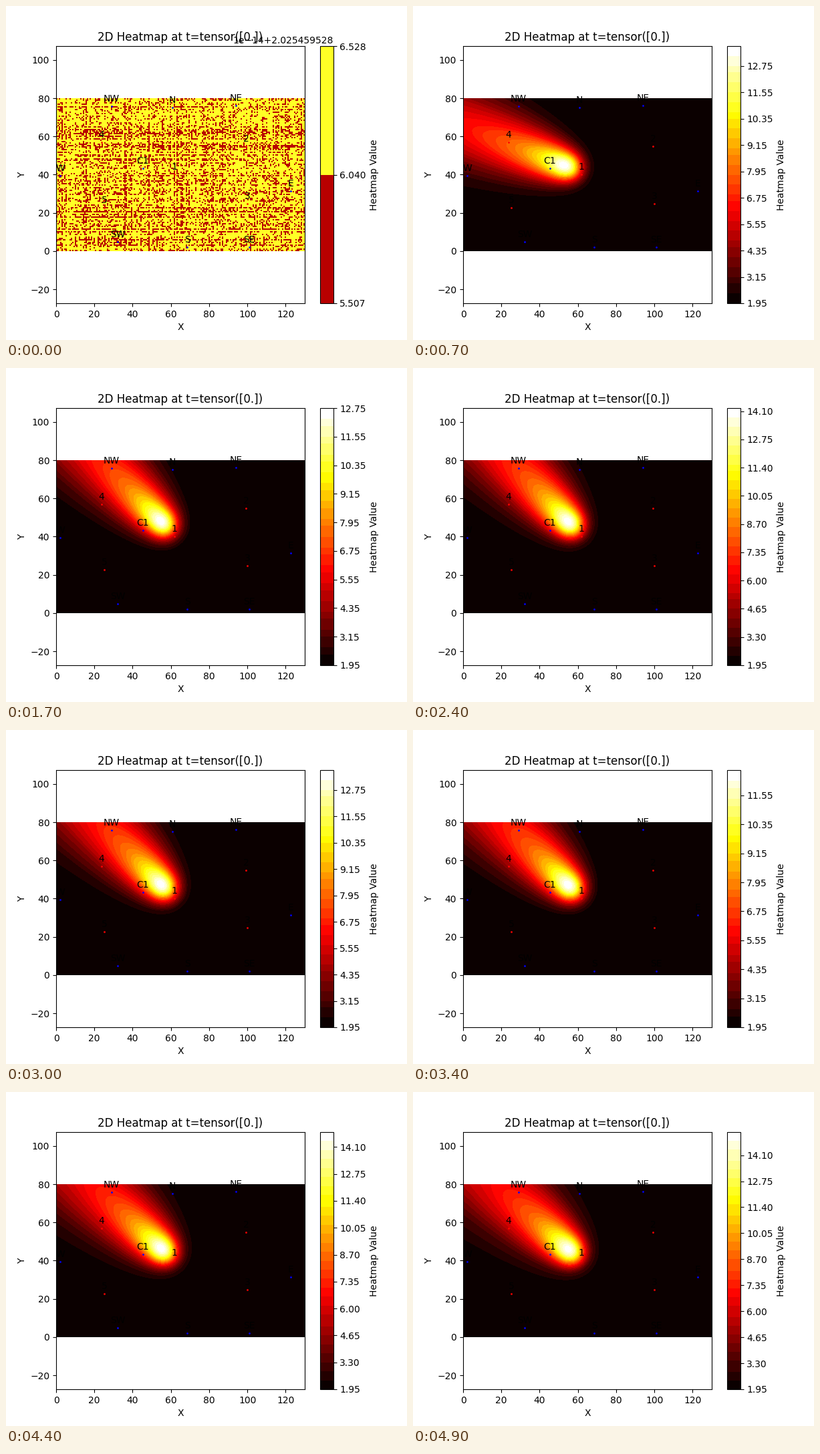
Animation, 600 px wide and 500 px high, one loop 5000 ms. Source, as a matplotlib script:

```python
import numpy as np
import matplotlib.pyplot as plt
from matplotlib.animation import FuncAnimation
from matplotlib.colors import ListedColormap

FRAMES, INTERVAL = 50, 100
BACKGROUND = 2.025459528
WIDTH, HEIGHT = 130, 80
HOT = plt.get_cmap("hot")
HOT_BANDS = plt.get_cmap("hot", 28)

RED_SITES = {"1": (61.9, 40.2), "2": (99.4, 54.7), "3": (100.1, 24.8),
             "4": (23.6, 57.0), "5": (25.3, 22.7)}
BLUE_SITES = {"N": (60.8, 75.0), "NE": (94.0, 76.2), "E": (122.8, 31.3),
              "SE": (101.0, 2.1), "S": (68.5, 2.1), "SW": (32.3, 4.9),
              "W": (2.2, 39.5), "NW": (29.0, 75.7), "C1": (45.4, 43.3)}

# The maximum drifts between a few turning points.
PEAK_FRAMES = [1, 7, 17, 24, 30, 36, 39, 49]
PEAK_VALUES = [13.1, 13.6, 12.7, 14.2, 13.6, 12.0, 14.5, 15.2]

X, Y = np.meshgrid(np.linspace(0, WIDTH, 131), np.linspace(0, HEIGHT, 81))
PUFFS = np.arange(0, 150, 1.5)


def plume(along, across, spread):
    """Sum of Gaussian puffs that widen as they drift downwind."""
    total = np.zeros(np.shape(along))
    for s in PUFFS:
        var = 21 + spread * s
        total += var ** -1.15 * np.exp(-((along - s) ** 2 + across ** 2) / (2 * var))
    return total


def concentration(frame):
    turn = 1 / (1 + np.exp((12 - frame) / 2))
    angle = np.radians(20 + 31 * turn - 0.18 * frame)
    px = 52.5 + 2.4 * turn
    py = 44.2 + 4.6 * turn - 0.075 * (frame - 12)
    spread = 2.6 + 0.02 * frame

    dx, dy = -np.cos(angle), np.sin(angle)
    axis = np.linspace(0, 20, 201)
    profile = plume(axis, 0, spread)
    rx, ry = X - px, Y - py
    along = rx * dx + ry * dy + axis[profile.argmax()]
    field = plume(along, rx * dy - ry * dx, spread) / profile.max()
    peak = np.interp(frame, PEAK_FRAMES, PEAK_VALUES)
    return BACKGROUND + (peak - BACKGROUND) * field


def draw_rounding_noise(ax):
    rng = np.random.default_rng(4)
    ny, nx = 115, 186
    row, col = rng.normal(size=(ny, 1)), rng.normal(size=(1, nx))
    noise = 0.9 * rng.normal(size=(ny, nx)) + 0.5 * row + 0.4 * col
    noise += 0.4 * rng.normal(size=(ny, 1)) * rng.normal(size=(1, nx))
    mesh = ax.pcolormesh(np.linspace(0, WIDTH, nx + 1), np.linspace(0, HEIGHT, ny + 1),
                         noise > np.quantile(noise, 0.3), vmin=0, vmax=1,
                         cmap=ListedColormap([HOT(6 / 23), HOT(18 / 23)]))
    bar = fig.colorbar(mesh, ax=ax, label="Heatmap Value", ticks=[0, 0.5, 1])
    bar.ax.set_yticklabels(["5.507", "6.040", "6.528"])
    fig.text(489.5 / 600, 1 - 55.8 / 500, "1e\u221214+2.025459528", ha="right")


def draw_sites(ax, sites, color):
    for name, (x, y) in sites.items():
        ax.plot(x, y, "o", color=color, markersize=1)
        ax.annotate(name, (x, y), xytext=(0, 5), textcoords="offset points",
                    ha="center")


def update(frame):
    fig.clear()
    ax = fig.add_subplot()
    if frame == 0:
        draw_rounding_noise(ax)
    else:
        filled = ax.contourf(X, Y, concentration(frame), 100, cmap=HOT_BANDS)
        fig.colorbar(filled, ax=ax, label="Heatmap Value")
    draw_sites(ax, RED_SITES, "red")
    draw_sites(ax, BLUE_SITES, "blue")
    half = WIDTH / 2 * 385 / 372
    ax.set(xlim=(0, WIDTH), ylim=(HEIGHT / 2 - half, HEIGHT / 2 + half),
           xlabel="X", ylabel="Y", title="2D Heatmap at t=tensor([0.])")
    return []


fig = plt.figure(figsize=(6, 5), dpi=100)
anim = FuncAnimation(fig, update, frames=FRAMES, interval=INTERVAL,
                     repeat=True, repeat_delay=0)
plt.show()
```
